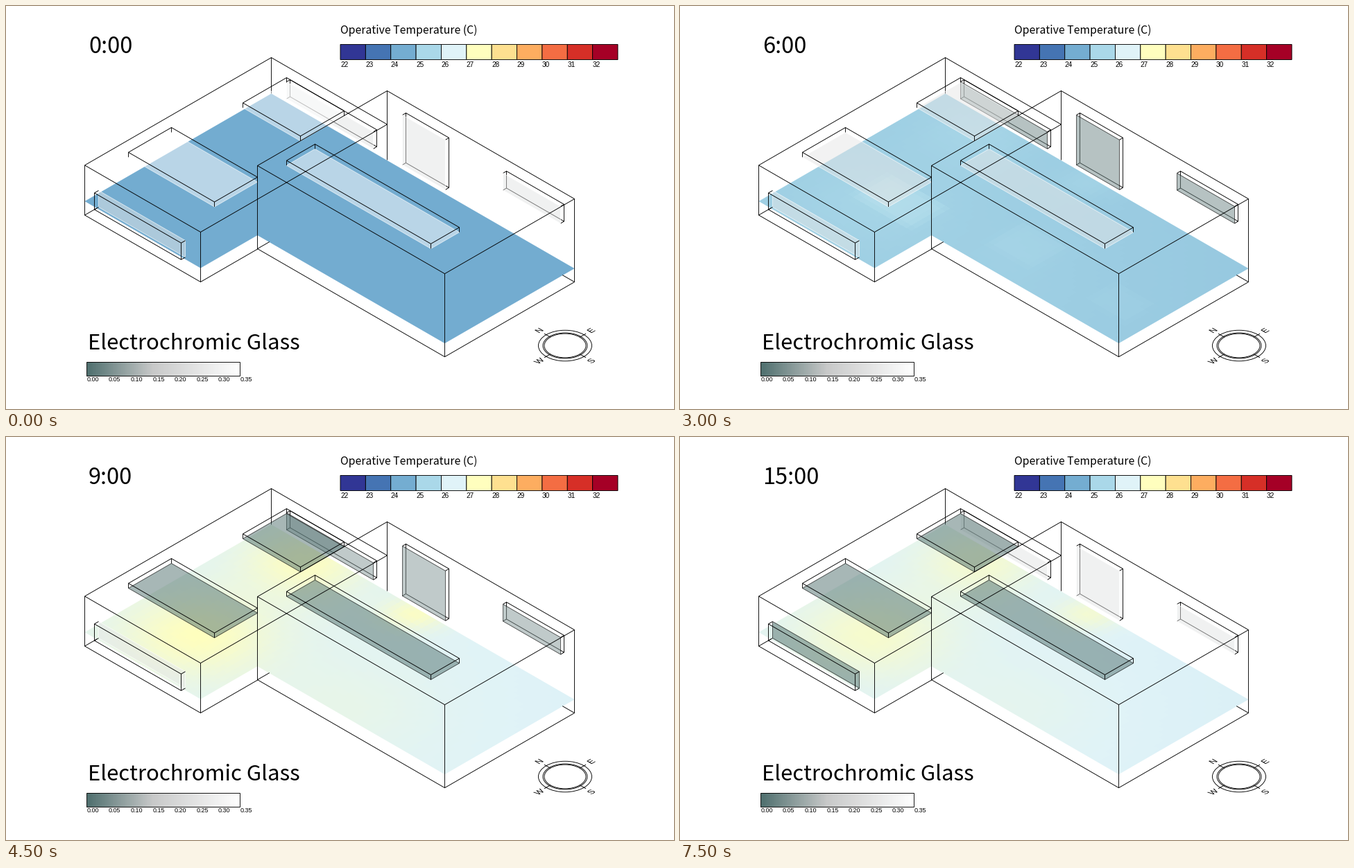
Recreate the animation shown at these times as a matplotlib script. Size 963x582 px, loop 8 s.

```python
import numpy as np
import matplotlib.pyplot as plt
from matplotlib.animation import FuncAnimation
from matplotlib.colors import LinearSegmentedColormap
from matplotlib.patches import Ellipse, PathPatch, Polygon, Rectangle
from matplotlib.textpath import TextPath
from matplotlib.transforms import Affine2D

W, H, DPI = 963, 582, 96
PT = 72 / DPI
SLOPE = 0.578
UI, SMALL = "Noto Sans CJK JP", "Liberation Sans"

heat = LinearSegmentedColormap.from_list(
    "heat", plt.get_cmap("RdYlBu_r")(np.linspace(0, 1, 11)), N=1024)
tint = LinearSegmentedColormap.from_list(
    "tint", [(0, "#50706f"), (0.43, "#c8c9c9"), (1, "white")])

plt.rcParams["path.snap"] = False
fig = plt.figure(figsize=(W / DPI, H / DPI), dpi=DPI, facecolor="white")
ax = fig.add_axes([0, 0, 1, 1])
ax.axis("off")


def ease(t, start, end):
    k = np.clip((t - start) / (end - start), 0, 1)
    return k * k * (3 - 2 * k)


def iso(x, y, a=0, b=0):
    """Point a steps down-right and b steps down-left of (x, y)."""
    return x + a - b, y + (a + b) * SLOPE


def iso_rect(x, y, a, b):
    return [iso(x, y), iso(x, y, a), iso(x, y, a, b), iso(x, y, 0, b)]


def shift(pts, dx, dy):
    return [(x + dx, y + dy) for x, y in pts]


def line(*pts, z=6):
    ax.plot(*zip(*pts), color="black", lw=0.9 * PT, zorder=z,
            solid_capstyle="butt", solid_joinstyle="miter")


def text(x, y, s, px, font):
    return ax.text(x, y, s, fontsize=px * PT, family=font, color="black",
                   ha="left", va="baseline", zorder=8)


def frame(x0, y0, x1, y1, fill="none"):
    ax.add_patch(Rectangle((x0, y0), x1 - x0, y1 - y0, fc=fill, ec="black",
                           lw=0.9 * PT, zorder=5))


def pane(pts, z):
    p = Polygon(pts, closed=True, lw=0.9 * PT, zorder=z)
    ax.add_patch(p)
    return p


def block(x, y, a, b, height, level, run):
    """Room outline; run is the visible length of its right front base."""
    top = iso_rect(x, y, a, b)
    back, right, front, left = top
    base = shift(top, 0, height)
    hidden = (height - level) / (2 * SLOPE)
    line(*top, back)
    line(back, (x, y + level), z=2)
    line(left, base[3], base[2], iso(*base[2], 0, -run))
    line(front, base[2])
    line(base[3], iso(*base[3], 0, -hidden))
    if run == b:
        line(right, base[1], iso(*base[1], -hidden))


def skylight(x, y, a, b):
    top = iso_rect(x, y, a, b)
    low = shift(top, 0, 7)
    line(*top, top[0])
    for ends in zip(top, low):
        line(*ends)
    return pane(low, 5)


def window(x, y, a, h, front=False):
    """Wall box: a glass plane and a second rim behind or before it."""
    far = iso(x, y, a)
    glass = [(x, y), far, (far[0], far[1] + h), (x, y + h)]
    rim = shift(glass, *((-6, 3.5) if front else (5, -3)))
    z = 6 if front else 3
    line(*rim, rim[0], z=z)
    for ends in zip(glass, rim):
        line(*ends, z=z)
    return pane(glass, 4)


block(382, 74, 167, 269, 72, 52, run=83)
block(549, 122, 270, 187, 120, 100, run=187)
roofs = [skylight(404, 103, 83, 63), skylight(238, 175, 124, 62),
         skylight(445, 199, 208, 41)]
east = [window(404, 109, 125, 24.5), window(571, 157, 62, 72),
        window(716, 241, 83, 24.5)]
west = [window(133, 266, 125, 24, front=True)]

# Floor in 7-step cells along the two building axes
FX, FY, CELL = 382, 126, 7
px, py = np.meshgrid(np.arange(W) - FX, (np.arange(H) - FY) / SLOPE)
fa, fb = ((np.floor(k / CELL) + 0.5) * CELL
          for k in ((py + px) / 2, (py - px) / 2))
cx, cy = iso(FX, FY, fa, fb)


def glow(x, y, rx, ry):
    return np.exp(-((cx - x) / rx) ** 2 - ((cy - y) / ry) ** 2)


def patch(x, y, ra, rb):
    """Sunlit rectangle with nearly hard edges."""
    dx, dy = x - FX, (y - FY) / SLOPE
    d = ((fa - (dy + dx) / 2) / ra) ** 8 + ((fb - (dy - dx) / 2) / rb) ** 8
    return np.exp(-np.minimum(d, 50))


cool = np.clip((cx - 460) / 360, 0, 1)
sunny = (1.15 * glow(275, 285, 105, 58) + 1.05 * glow(430, 180, 85, 48)
         + 1.05 * glow(590, 255, 48, 22) + 0.2 * glow(490, 390, 125, 62))
dawn = [(5, 0.14 * patch(505, 350, 40, 50) + 0.12 * patch(405, 200, 45, 40)),
        (6, 0.24 * patch(317, 282, 42, 27) + 0.08 * patch(500, 345, 32, 27)
         + 0.06 * patch(635, 428, 28, 22))]


def floor_rgb(hour):
    rise = np.sin(np.pi / 2 * np.clip((hour - 4) / 7, 0, 1)) ** 1.1
    dusk = ease(hour, 11, 15)
    temp = 24 - 0.28 * ease(hour, 0, 3) + 2.68 * rise - 0.35 * dusk
    temp = temp - 0.14 * ease(hour, 4, 5) * cool
    temp = temp + 1.08 * ease(hour, 4.5, 11.5) * (1 - 0.45 * dusk) * sunny
    for peak, light in dawn:
        temp = temp + np.exp(-2 * (hour - peak) ** 2) * light
    return heat((temp - 22) / 10)[..., :3]


floor = ax.imshow(floor_rgb(0), extent=(-0.5, W - 0.5, H - 0.5, -0.5),
                  aspect="auto", interpolation="nearest", zorder=1)
outline = [iso(FX, FY, a, b) for a, b in (
    (0, 0), (437, 0), (437, 187), (167, 187), (167, 269), (0, 269))]
floor.set_clip_path(Polygon(outline, closed=True, transform=ax.transData))

# Temperature legend
text(481.5, 40, "Operative Temperature (C)", 15.8, UI)
step = 400 / 11
for i in range(11):
    x = 481.5 + i * step
    frame(x, 55, x + step, 77, heat(i / 10))
    text(x, 87, str(22 + i), 10, SMALL)

# Transmittance legend
text(117, 496, "Electrochromic Glass", 31.1, UI)
ax.imshow(np.linspace(0, 1, 221)[None], cmap=tint, aspect="auto",
          extent=(116, 337, 534, 514), zorder=4)
frame(116, 514, 337, 534)
for i in range(8):
    text(116 + i * 31.57, 542, f"{i * 0.05:.2f}", 9, SMALL)

# Compass, lettered on the ground plane
MX, MY = 805.5, 490
for rx in (38.5, 32, 30):
    ax.add_patch(Ellipse((MX, MY), 2 * rx, 2 * rx * SLOPE, fc="none",
                         ec="black", lw=0.9 * PT, zorder=5))
for letter, sx, sy in (("N", -1, -1), ("E", 1, -1), ("W", -1, 1), ("S", 1, 1)):
    line(*((MX + r * sx, MY + r * SLOPE * sy) for r in (21, 30)))
    glyph = TextPath((0, 0), letter, size=12, prop={"family": SMALL})
    box = glyph.get_extents()
    place = Affine2D().translate(-(box.x0 + box.x1) / 2, -(box.y0 + box.y1) / 2)
    place += Affine2D.from_values(.87, -.5, -.87, -.5,
                                  MX + 37.5 * sx, MY + 22 * sy)
    ax.add_patch(PathPatch(place.transform_path(glyph), fc="black", lw=0,
                           zorder=6))

clock = text(118.5, 68, "0:00", 32.5, UI)
ax.set_xlim(-0.5, W - 0.5)
ax.set_ylim(H - 0.5, -0.5)


def set_glass(panes, value):
    edge = np.clip((value - 0.08) / 0.17, 0, 1)
    for p in panes:
        p.set_facecolor((*tint(value / 0.35)[:3], 0.5))
        p.set_edgecolor((edge, edge, edge, 0.65))


def draw(hour):
    clock.set_text(f"{hour}:00")
    floor.set_data(floor_rgb(hour))
    set_glass(roofs, 0.35 * (1 - ease(hour, 5, 8)))
    set_glass(east, 0.25 * (1 - ease(hour, 3, 7) + ease(hour, 8, 11)))
    set_glass(west, 0.26 * (1 - ease(hour, 11, 15)))
    return [clock, floor, *roofs, *east, *west]


anim = FuncAnimation(fig, draw, frames=16, interval=500, repeat=True)
plt.show()
```
